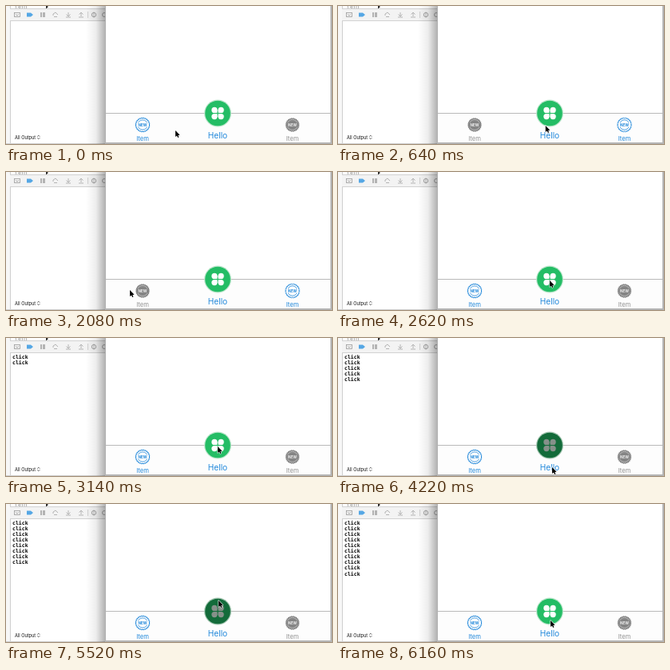
These frames come from a looping animation (408x173 px, 6240 ms). An HTML page with a canvas:

```html
<!DOCTYPE html>
<html lang="en">
<head>
<meta charset="utf-8">
<title>Tab bar clicks</title>
<style>
  html, body { margin: 0; width: 100%; height: 100%; overflow: hidden; background: #fff; }
  canvas { display: block; width: 408px; height: 173px; }
</style>
</head>
<body>
<canvas id="stage"></canvas>
<script>
const W = 408, H = 173, LOOP = 6240;
const BLUE = '#2088db', GREY = '#929292';
const UI = 'Inter, "Liberation Sans", sans-serif';
const MONO = '"DejaVu Sans Mono", monospace';
const canvas = document.getElementById('stage');
const ctx = canvas.getContext('2d');
const scale = window.devicePixelRatio || 1;
canvas.width = W * scale;
canvas.height = H * scale;

// Cursor stops: time, x, y
const path = [
  [0, 212, 156], [320, 354, 150], [460, 354, 150], [820, 167, 150], [940, 167, 150],
  [1320, 347, 148], [1400, 355, 149], [1620, 355, 149], [2060, 155, 148], [2160, 155, 148],
  [2230, 168, 149], [2310, 168, 149], [2600, 265, 136], [3600, 265, 136],
  [3700, 266, 142], [3780, 266, 142], [3920, 268, 158], [4040, 268, 158],
  [4160, 268, 162], [4320, 268, 162], [4800, 267, 138], [5200, 267, 138],
  [5440, 266, 121], [5620, 266, 121], [5860, 267, 157], [6020, 267, 157],
  [6150, 266, 146], [6240, 266, 146]
];
// Button presses: down, up
const presses = [
  [2660, 2760], [2940, 3040], [3340, 3440], [3640, 3740], [3940, 4040],
  [4200, 4300], [4880, 4980], [5220, 5320], [5480, 5600], [5920, 6020]
];
const tabSwitches = [400, 890, 1460, 2270];

function cursorAt(t) {
  const i = Math.max(1, path.findIndex(p => p[0] > t));
  const [t0, x0, y0] = path[i - 1], [t1, x1, y1] = path[i];
  const u = (t - t0) / (t1 - t0);
  const k = u * u * (3 - 2 * u);
  return [x0 + (x1 - x0) * k, y0 + (y1 - y0) * k];
}

function rect(x, y, w, h, color) {
  ctx.fillStyle = color;
  ctx.fillRect(x, y, w, h);
}

function disc(x, y, r, color) {
  ctx.fillStyle = color;
  ctx.beginPath();
  ctx.arc(x, y, r, 0, 7);
  ctx.fill();
}

function ring(x, y, r, width, color) {
  ctx.strokeStyle = color;
  ctx.lineWidth = width;
  ctx.beginPath();
  ctx.arc(x, y, r, 0, 7);
  ctx.stroke();
}

function polygon(points) {
  ctx.beginPath();
  points.forEach(([x, y]) => ctx.lineTo(x, y));
  ctx.closePath();
}

function line(points, color, width = 1) {
  ctx.strokeStyle = color;
  ctx.lineWidth = width;
  ctx.beginPath();
  points.forEach(([x, y]) => ctx.lineTo(x, y));
  ctx.stroke();
}

function text(str, x, y, font, color, align = 'left') {
  ctx.font = font;
  ctx.fillStyle = color;
  ctx.textAlign = align;
  ctx.fillText(str, x, y);
}

function drawToolbar() {
  text('130.0', 11, 3.6, `6px ${UI}`, '#777');
  ctx.fillStyle = '#222';
  polygon([[50, -1], [53, 1], [50, 3.5]]);
  ctx.fill();
  rect(5, 4, 120, 14, '#f3f3f3');
  rect(5, 3, 120, 1, '#d2d2d2');
  rect(5, 18, 120, 1, '#d2d2d2');

  const ink = '#b3b3b3';
  ctx.strokeStyle = '#999';
  ctx.lineWidth = 0.8;
  ctx.strokeRect(10.5, 8.5, 7, 5);
  line([[12, 10.5], [14, 12], [16, 10.5]], '#999', 0.8);
  ctx.fillStyle = '#55a7e5';
  polygon([[26, 8.5], [31, 8.5], [34, 11], [31, 13.5], [26, 13.5]]);
  ctx.fill();
  rect(43, 8, 2, 6, ink);
  rect(46, 8, 3, 6, ink);
  line([[59, 12], [59, 10], [62, 8], [65, 11]], ink);
  line([[60, 13.5], [64, 13.5]], ink);
  line([[78, 8], [78, 12.5]], ink);
  line([[75.5, 10.5], [78, 13], [80.5, 10.5]], ink);
  line([[75, 14], [81, 14]], ink);
  line([[94, 13], [94, 8.5]], ink);
  line([[91.5, 10.5], [94, 8], [96.5, 10.5]], ink);
  line([[91, 14], [97, 14]], ink);
  rect(102, 7, 1, 8, '#d0d0d0');
  ring(110, 11, 2.7, 1, '#a5a5a5');
  line([[110, 7.5], [110, 14.5]], '#a5a5a5', 0.8);
  ring(123, 11, 2.5, 1, '#a5a5a5');
}

function drawConsole(count) {
  rect(0, 0, 5, H, '#f7f7f7');
  rect(5, 0, 1, H, '#cfcfcf');
  drawToolbar();
  for (let i = 0; i < count; i++) {
    text('click', 8, 25.8 + i * 7.08, `bold 6.5px ${MONO}`, '#000');
  }
  text('All Output', 11, 166.7, `5.6px ${UI}`, '#111');
  line([[39.3, 163.7], [40.8, 162.2], [42.3, 163.7]], '#333', 0.8);
  line([[39.3, 165.3], [40.8, 166.8], [42.3, 165.3]], '#333', 0.8);
  rect(0, 172, 125, 1, '#d0d0d0');
}

function drawWindow() {
  const shade = ctx.createLinearGradient(100, 0, 125, 0);
  shade.addColorStop(0, 'rgba(0,0,0,0)');
  shade.addColorStop(0.5, 'rgba(0,0,0,.07)');
  shade.addColorStop(1, 'rgba(0,0,0,.32)');
  rect(100, 0, 25, H, shade);
  rect(124, 0, 284, H, '#b4b4b4');
  rect(125, 0, 281, 171, '#fff');
  rect(125, 135, 281, 36, '#fdfdfd');
  rect(125, 134, 281, 1, '#b9b9b9');
}

function drawTab(x, selected) {
  const y = 149, color = selected ? BLUE : GREY;
  const teeth = Array.from({ length: 48 }, (_, i) => {
    const a = i * Math.PI / 24, r = i % 2 ? 9 : 8.1;
    return [x + r * Math.cos(a), y + r * Math.sin(a)];
  });
  polygon(teeth);
  if (selected) {
    ctx.strokeStyle = color;
    ctx.lineWidth = 1;
    ctx.stroke();
    ring(x, y, 6.2, 0.8, color);
  } else {
    ctx.fillStyle = '#858585';
    ctx.fill();
    ring(x, y, 6.6, 0.6, '#d8d8d8');
  }
  rect(x - 7, y - 2.6, 14, 5.2, selected ? '#fdfdfd' : '#858585');
  text('NEW', x, y + 1.6, `bold 4.6px ${UI}`, selected ? color : '#f2f2f2', 'center');
  text('Item', x, 168.7, `7.6px ${UI}`, color, 'center');
}

function drawButton(pressed) {
  const x = 265, y = 134.5;
  disc(x, y, 17, pressed ? '#9fc3ad' : '#b9e5ca');
  disc(x, y, 15.8, pressed ? '#136b3a' : '#24bd65');
  ctx.fillStyle = pressed ? '#86918a' : '#fff';
  for (const sx of [-1, 1]) {
    for (const sy of [-1, 1]) {
      ctx.beginPath();
      ctx.arc(x + sx * 4.1, y + sy * 4.1, 3.6, 0, 7);
      ctx.fill();
      ctx.fillRect(x + (sx > 0 ? 0.6 : -4.1), y + (sy > 0 ? 0.6 : -4.1), 3.5, 3.5);
    }
  }
  text('Hello', x, 166, `10.1px ${UI}`, BLUE, 'center');
}

function drawCursor([x, y]) {
  ctx.save();
  ctx.translate(x, y);
  polygon([[0, 0], [0, 8], [1.9, 6.4], [3.1, 9], [4.4, 8.4], [3.3, 5.9], [5.6, 5.7]]);
  ctx.lineJoin = 'round';
  ctx.lineWidth = 1.2;
  ctx.strokeStyle = 'rgba(255,255,255,.85)';
  ctx.stroke();
  ctx.fillStyle = '#000';
  ctx.fill();
  ctx.restore();
}

function draw(t) {
  const clicks = presses.filter(p => t >= p[1]).length;
  const pressed = presses.some(([down, up]) => t >= down && t < up);
  const rightTab = tabSwitches.filter(s => t >= s).length % 2 === 1;
  ctx.setTransform(scale, 0, 0, scale, 0, 0);
  rect(0, 0, W, H, '#fff');
  drawConsole(clicks);
  drawWindow();
  drawTab(171, !rightTab);
  drawTab(358.5, rightTab);
  drawButton(pressed);
  drawCursor(cursorAt(t));
}

const start = performance.now();
function tick() {
  draw((performance.now() - start) % LOOP);
  requestAnimationFrame(tick);
}
tick();
</script>
</body>
</html>
```
